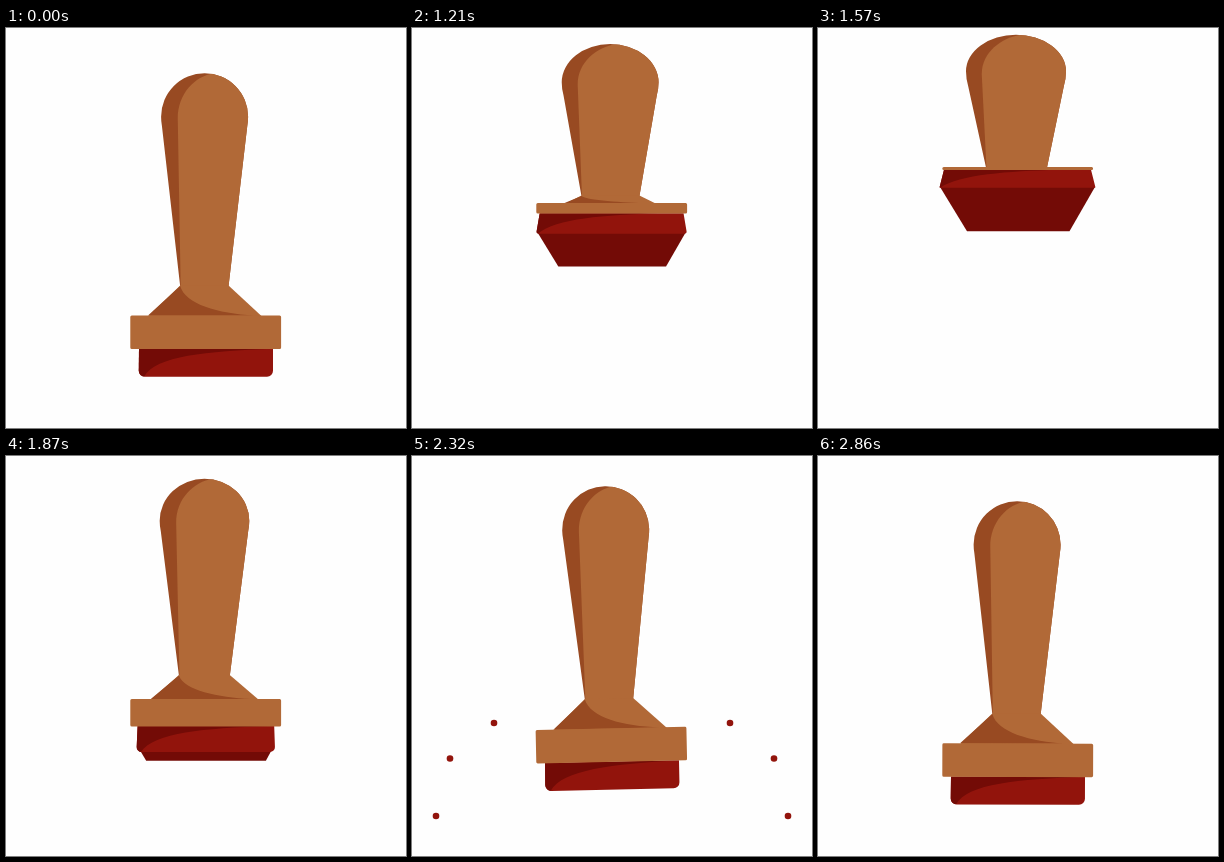
An HTML page with a canvas that plays this animation: 400 px wide and 400 px high, repeating every 2.89 s.

```html
<!DOCTYPE html>
<html lang="en">
<head>
<meta charset="utf-8">
<title>Rubber stamp</title>
<style>
html, body { margin: 0; width: 100%; height: 100%; overflow: hidden; background: #fefefe; }
canvas { display: block; width: 100vw; height: 100vh; object-fit: contain; }
</style>
</head>
<body>
<canvas id="stage"></canvas>
<script>
const LOOP = 2890;
const WOOD = '#b16937', WOOD_SHADE = '#984a22', RED = '#92140c', RED_SHADE = '#730b06';
const PIVOT = [199.5, 321];
const canvas = document.getElementById('stage');
const ctx = canvas.getContext('2d');
const scale = Math.max(1, window.devicePixelRatio || 1);
canvas.width = canvas.height = 400 * scale;

const lerp = (a, b, u) => a + (b - a) * u;
const span = (t, a, b) => Math.min(1, Math.max(0, (t - a) / (b - a)));
const smooth = u => u * u * (3 - 2 * u);
const outCubic = u => 1 - Math.pow(1 - u, 3);

function bezier(x1, y1, x2, y2) {
  const at = (s, a, b) => 3 * (1 - s) * (1 - s) * s * a + 3 * (1 - s) * s * s * b + s * s * s;
  return u => {
    if (u <= 0 || u >= 1) return u <= 0 ? 0 : 1;
    let lo = 0, hi = 1;
    for (let i = 0; i < 24; i++) {
      const mid = (lo + hi) / 2;
      if (at(mid, x1, x2) < u) lo = mid; else hi = mid;
    }
    return at(lo, y1, y2);
  };
}
const rise = bezier(0.2, 0.11, 0.2, 1);

// Smoothly interpolated [time, value] keys
function keyed(t, keys) {
  for (let i = 1; i < keys.length; i++) {
    const [a, va] = keys[i - 1], [b, vb] = keys[i];
    if (t < b) return lerp(va, vb, smooth(span(t, a, b)));
  }
  return keys[keys.length - 1][1];
}

function fill(color, draw) {
  ctx.beginPath();
  draw();
  ctx.closePath();
  ctx.fillStyle = color;
  ctx.fill();
}

function polygon(color, ...pts) {
  fill(color, () => pts.forEach(([x, y]) => ctx.lineTo(x, y)));
}

function drawBurst(t) {
  if (t < 1960 || t > 2440) return;
  const head = outCubic(span(t, 1960, 2160));
  const tail = Math.min(head, smooth(span(t, 1975, 2260)));
  ctx.strokeStyle = RED;
  ctx.lineWidth = 6.6;
  ctx.lineCap = 'round';
  for (const side of [-1, 1]) {
    for (const [dx, dy] of [[176, 0], [162, 57.5], [118, 93]]) {
      const point = u => {
        const r = lerp(0.45, 1, u);
        return [200 + side * dx * r, 360 - dy * r];
      };
      const [x, y] = point(head);
      ctx.beginPath();
      ctx.moveTo(...point(tail));
      ctx.lineTo(x + 0.01, y);
      ctx.stroke();
    }
  }
}

function drawRubber(p, top) {
  const h = lerp(28, 18, p), bottom = top + h, r = lerp(6, 0.5, p);
  const tl = lerp(133, 126, p), tr = lerp(267, 273, p);
  const bl = lerp(132.7, 121.5, p), br = lerp(267, 277.5, p);
  if (p > 0) {
    const base = bottom + 43.5 * p, inset = r * 0.8;
    polygon(RED_SHADE, [bl + inset, bottom - 1], [br - inset, bottom - 1],
      [lerp(262, 251.5, p), base], [lerp(138, 149, p), base]);
  }
  const outline = () => {
    ctx.moveTo(tl, top);
    ctx.lineTo(tr, top);
    ctx.arcTo(br, bottom, bl, bottom, r);
    ctx.arcTo(bl, bottom, tl, top, r);
  };
  fill(RED, outline);
  ctx.save();
  ctx.beginPath();
  outline();
  ctx.clip();
  fill(RED_SHADE, () => {
    ctx.moveTo(tl - 12, top);
    ctx.lineTo(lerp(267, 240, p), top);
    ctx.bezierCurveTo(lerp(200, 190, p), top + h * 0.09,
      lerp(150, 142, p), top + h * 0.25, lerp(138, 122, p), bottom);
    ctx.lineTo(tl - 12, bottom);
  });
  ctx.restore();
}

function drawSkirt(p, neckY, y, neckL, neckR) {
  if (y - neckY < 0.3) return;
  const l = lerp(142, 156, p), r = lerp(256, 241, p), h = y - neckY;
  polygon(WOOD, [neckL, neckY - 0.5], [neckR, neckY - 0.5], [r, y + 1], [l, y + 1]);
  fill(WOOD_SHADE, () => {
    ctx.moveTo(neckL, neckY);
    ctx.bezierCurveTo(neckL + 5, neckY + h * 0.62, 212, neckY + h * 0.93, r - 8, y);
    ctx.lineTo(l, y);
  });
}

function drawHandle(p, top, neckY, neckL, neckR) {
  const rx = lerp(43.5, 50, p), ry = lerp(43.5, 36.5, p);
  const cx = lerp(198.6, 198, p), cy = top + ry;
  const l = cx - rx, r = cx + rx;
  const drop = lerp(9, 15, p), inset = lerp(0.8, 2.2, p);
  const outline = () => {
    ctx.moveTo(neckL, neckY);
    ctx.lineTo(l + inset, cy + drop);
    ctx.quadraticCurveTo(l, cy + drop / 2, l, cy);
    ctx.ellipse(cx, cy, rx, ry, 0, Math.PI, Math.PI * 2);
    ctx.quadraticCurveTo(r, cy + drop / 2, r - inset, cy + drop);
    ctx.lineTo(neckR, neckY);
  };
  fill(WOOD_SHADE, outline);
  ctx.save();
  ctx.beginPath();
  outline();
  ctx.clip();
  const edge = lerp(171.8, 163.8, p), peak = lerp(208, 203, p);
  fill(WOOD, () => {
    ctx.moveTo(neckL + 0.5, neckY + 1);
    ctx.lineTo(edge, cy + 4);
    ctx.bezierCurveTo(edge - 1, cy - ry * 0.5, peak - 20, top + 3, peak, top);
    ctx.lineTo(r + 2, top - 2);
    ctx.lineTo(r + 2, neckY + 1);
  });
  ctx.restore();
}

// p: how far the stamp leans towards the viewer, q: how far it is lifted
function drawStamp(p, q) {
  const plateY = 287.5 - 38.5 * q - 110 * p;
  const plateH = lerp(33.5, 3, p);
  const neckY = plateY - 29.5 * (1 - p);
  const neckL = lerp(174.2, 168, p), neckR = lerp(222.5, 229, p);
  drawRubber(p, plateY + plateH - 0.3);
  drawHandle(p, 45.2 - 38.5 * q, neckY + 0.4, neckL, neckR);
  drawSkirt(p, neckY, plateY, neckL, neckR);
  fill(WOOD, () => ctx.roundRect(124.3, plateY, 150.8, plateH, Math.min(1.5, plateH / 2)));
}

function draw(t) {
  let p, q;
  if (t < 1650) {
    p = q = rise(span(t, 1000, 1500));
  } else {
    p = 1 - smooth(span(t, 1650, 1960));
    q = 1 - Math.pow(span(t, 1650, 1960), 2.6);
  }
  const hop = keyed(t, [[2200, 0], [2430, -28], [2800, 0]]);
  const tilt = keyed(t, [[2260, 0], [2400, -3], [2600, 4.5], [LOOP, 0]]);

  ctx.setTransform(scale, 0, 0, scale, 0, 0);
  ctx.fillStyle = '#fefefe';
  ctx.fillRect(0, 0, 400, 400);
  drawBurst(t);
  ctx.translate(PIVOT[0], PIVOT[1] + hop);
  ctx.rotate(tilt * Math.PI / 180);
  ctx.translate(-PIVOT[0], -PIVOT[1]);
  drawStamp(p, q);
}

const start = performance.now();
function tick() {
  draw((performance.now() - start) % LOOP);
  requestAnimationFrame(tick);
}
tick();
</script>
</body>
</html>
```
